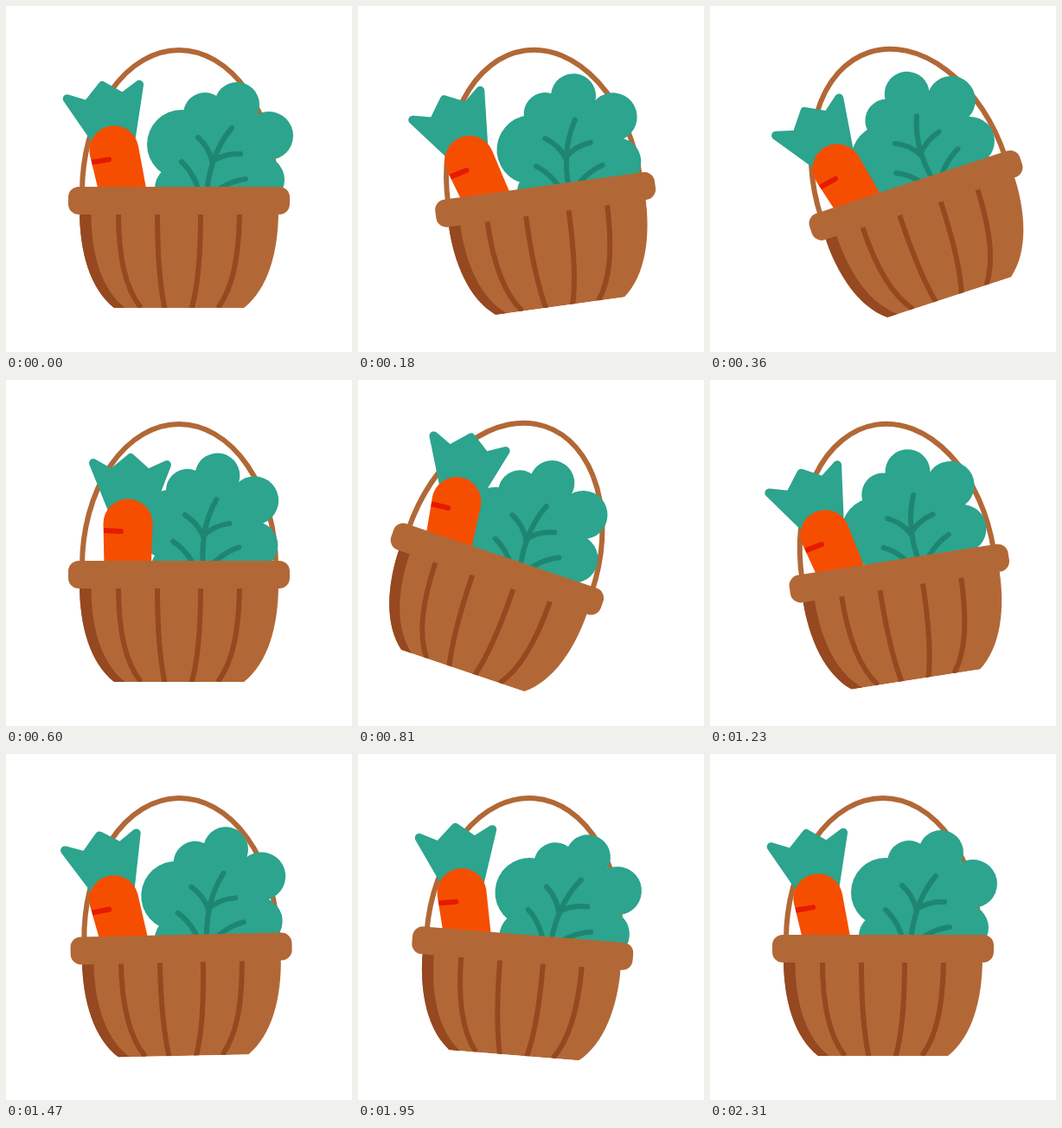
An HTML page for the animation above (2.34 s loop, 400 by 400 pixels).

```html
<!DOCTYPE html>
<html lang="en">
<head>
<meta charset="utf-8">
<title>Swinging basket</title>
<style>
  html, body { margin: 0; width: 100%; height: 100%; overflow: hidden; background: #fff; }
  svg { display: block; width: 100vw; height: 100vh; }
  .line { fill: none; stroke-width: 6; }
  .round { stroke-linecap: round; }
</style>
</head>
<body>
<svg viewBox="0 0 400 400">
  <defs>
    <clipPath id="bodyClip">
      <path d="M85 236C85 284 97 327 125 349H275C303 327 315 284 315 236Z"/>
    </clipPath>
  </defs>
  <g id="basket">
    <path class="line" stroke="#b26836" d="M88 215A112 164 0 0 1 312 215"/>

    <g id="lettuce">
      <g fill="#2ca48e">
        <path d="M203 160L230 125L267 114L304 150L294 200V250H190Z"/>
        <circle cx="203" cy="160" r="40"/>
        <circle cx="230" cy="125" r="25"/>
        <circle cx="267" cy="114" r="26"/>
        <circle cx="304" cy="150" r="28"/>
        <circle cx="294" cy="201" r="28"/>
        <circle cx="200" cy="211" r="28"/>
      </g>
      <path class="line round" stroke="#1e8670" d="M261 141Q233 174 231 230M222 152Q234 163 238 178M271 171Q252 170 238 180M203 180Q221 197 225 225M277 200Q254 203 233 222"/>
    </g>

    <g id="carrot">
      <path fill="#2ca48e" stroke="#2ca48e" stroke-width="10" stroke-linejoin="round" d="M101 96L122 108L144 90L164 108L186 98L162 160H127Z"/>
      <path fill="#f54e00" d="M112.500 166a28.500 28.500 0 0 1 57 0L167 240H114Z"/>
      <path fill="#e61a00" d="M113 171L133 172a3 3 0 0 1 0 6L113 177Z"/>
    </g>

    <g clip-path="url(#bodyClip)">
      <rect x="80" y="230" width="240" height="120" fill="#b26836"/>
      <path fill="#964820" d="M80 230H98.500V240C98.500 290 112 330 139 350H80Z"/>
      <path class="line" stroke="#964820" d="M130 240C130 290 139 328 156 349M175 240C175 290 178 325 184 352M225 240C225 290 222 325 214 352M270 240C269 292 262 326 245 349"/>
    </g>
    <rect x="72" y="209" width="256" height="32" rx="12" fill="#b26836"/>
  </g>
</svg>
<script>
  const LOOP = 2340, STEP = 30;

  // Each part turns about its pivot; keys are [ms, degrees].
  const parts = [
    { id: "basket", pivot: [200, 103], base: 0,
      keys: [[0, 0], [405, -18.8], [795, 18.8], [1200, -9], [1740, 6.6], [2310, 0]] },
    { id: "lettuce", pivot: [236, 239], base: 0,
      keys: [[0, 0], [380, -18.2], [600, -10.2], [1000, -23.6], [1700, 0]] },
    { id: "carrot", pivot: [137, 240], base: -12.5,
      keys: [[0, 0], [250, -5.5], [600, 12.5], [1000, -2.6], [1900, 0]] }
  ];
  for (const p of parts) p.node = document.getElementById(p.id);

  const ease = u => u * u * (3 - 2 * u);

  function angleAt(keys, t) {
    const i = keys.findIndex(k => k[0] > t);
    if (i < 0) return keys[keys.length - 1][1];
    const [t0, a] = keys[i - 1], [t1, b] = keys[i];
    return a + (b - a) * ease((t - t0) / (t1 - t0));
  }

  function draw(now) {
    const t = Math.floor((now % LOOP) / STEP) * STEP;
    for (const { node, pivot, base, keys } of parts)
      node.setAttribute("transform", `rotate(${base + angleAt(keys, t)} ${pivot})`);
  }

  const start = performance.now();
  function tick() {
    draw(performance.now() - start);
    requestAnimationFrame(tick);
  }
  tick();
</script>
</body>
</html>
```
